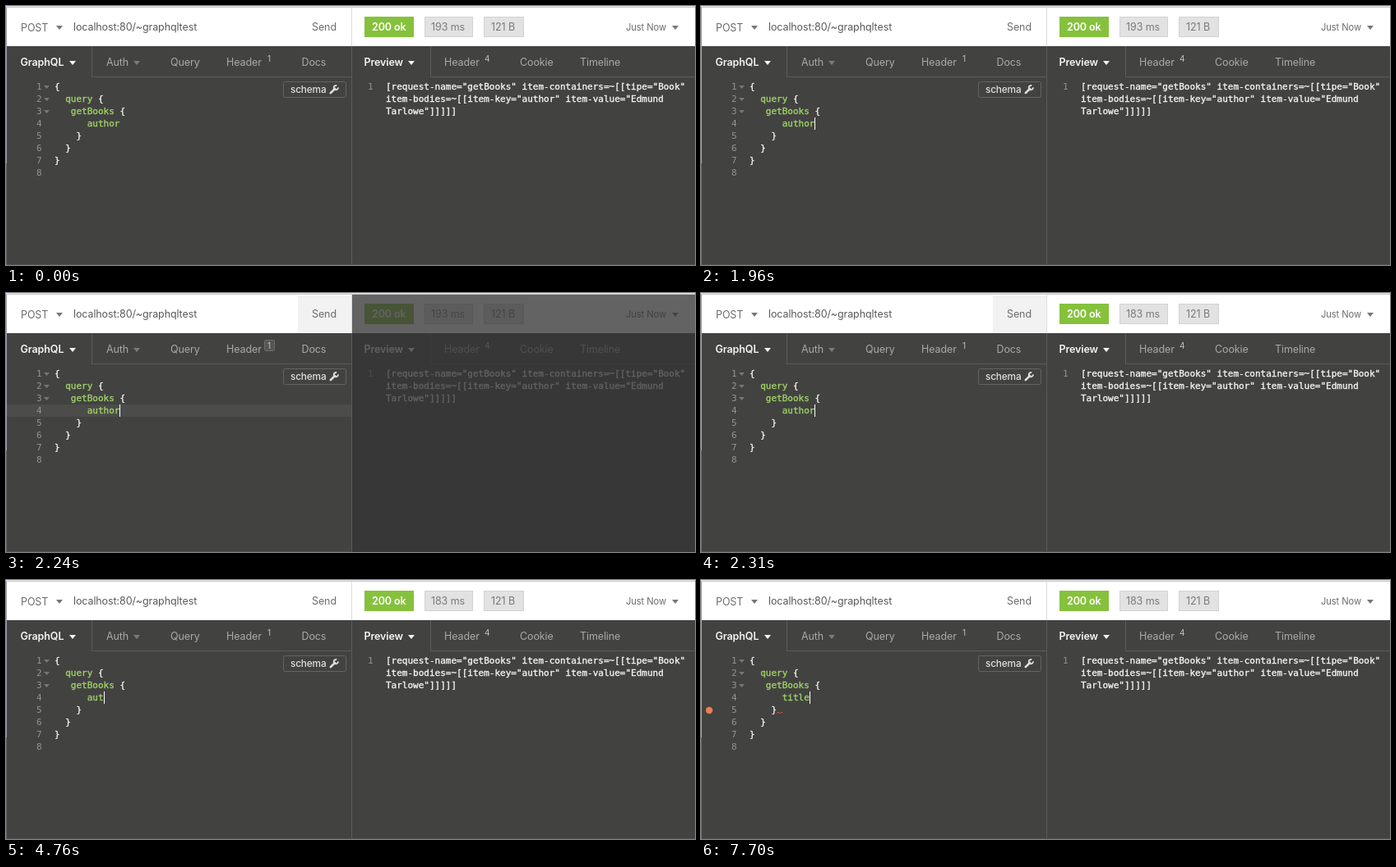
Recreate the animation shown at these times as an HTML page. Size 838x316 px, loop 8000 ms.

```html
<!DOCTYPE html>
<html lang="en">
<head>
<meta charset="utf-8">
<title>GraphQL request</title>
<style>
  html, body { margin: 0; width: 100%; height: 100%; overflow: hidden; background: #424241; }
  svg { display: block; }
  text { font: 12.5px Inter, sans-serif; letter-spacing: -0.1px; white-space: pre; }
  .strong { font-weight: 600; }
  .small { font-size: 11.2px; }
  .tiny { font-size: 10px; }
  .button { font-size: 11.8px; font-weight: 500; letter-spacing: -0.15px; }
  .code, .num { font: 11px "DejaVu Sans Mono", monospace; letter-spacing: 0; }
  .code { stroke: currentColor; stroke-width: 0.35px; }
</style>
</head>
<body>
<svg id="stage" width="838" height="316" viewBox="0 0 838 316"></svg>
<script>
const LOOP = 8000;
const COL = 6.622, CODE_X = 59, LINE = 15, BASE = 102;
const DARK = '#424241', RULE = '#5b5b5a', MUTED = '#a9a9a8', WHITE = '#f4f4f4',
      GREEN = '#a0d267', GREY = '#6c6c6c';
const stage = document.getElementById('stage');

function add(tag, attrs, parent = stage) {
  const el = document.createElementNS('http://www.w3.org/2000/svg', tag);
  for (const key in attrs) el.setAttribute(key, attrs[key]);
  return parent.appendChild(el);
}
const box = (x, y, width, height, fill, more) =>
  add('rect', { x, y, width, height, fill, ...more });
function label(x, y, str, fill, cls = '') {
  const el = add('text', { x, y, fill, class: cls, style: `color:${fill}` });
  el.textContent = str;
  return el;
}
const caret = (x, y, fill, w = 8, h = 5) =>
  add('path', { d: `M${x} ${y}h${w}l${-w / 2} ${h}z`, fill });
const code = (line, col, str, fill) =>
  label(CODE_X + col * COL, BASE + (line - 1) * LINE, str, fill, 'code');
const show = (el, on) => el.setAttribute('visibility', on ? 'visible' : 'hidden');

// Window and address bar
box(0, 0, 838, 316, DARK);
box(0, 0, 838, 49, '#ffffff');
box(0, 0, 838, 1, '#e6e5e8');
box(0, 1, 838, 1, '#c6c4ca');
const hover = box(355, 3, 65, 46, '#f2f2f2');
label(18, 30.5, 'POST', GREY);
caret(61, 24, '#777777');
label(82, 30, 'localhost:80/~graphqltest', '#5a5a5a');
label(372, 30, 'Send', GREY);

// Response summary
box(436, 13, 60, 25, '#86c13d');
label(445, 30, '200 ok', '#ffffff', 'strong');
for (const [x, w] of [[509, 59], [581, 49]])
  box(x + 0.5, 13.5, w - 1, 24, '#e2e2e2', { stroke: '#d2d2d2' });
const elapsed = label(517, 30, '', '#7a7a7a');
label(590, 30, '121 B', '#7a7a7a');
label(754, 30, 'Just Now', GREY, 'small');
caret(810, 24, '#777777');

// Tabs
box(104, 86, 316, 1, RULE);
box(516, 86, 322, 1, RULE);
box(104, 49, 1, 38, RULE);
box(516, 49, 1, 38, RULE);
label(17.5, 73, 'GraphQL', WHITE, 'strong');
caret(77, 67, WHITE);
label(435.5, 73, 'Preview', WHITE, 'strong');
caret(489, 67, WHITE);
caret(155, 67, '#7b7b7a');
for (const [x, name] of [[122, 'Auth'], [200, 'Query'], [268, 'Header'], [359.5, 'Docs'],
                         [533, 'Header'], [625, 'Cookie'], [698, 'Timeline']])
  label(x, 73, name, MUTED);
const badge = box(314.5, 57.5, 12, 13, '#555554', { stroke: '#6c6c6b', rx: 1 });
label(318, 68, '1', '#c4c4c3', 'tiny');
label(582, 68, '4', '#c4c4c3', 'tiny');

// Query editor
const activeLine = box(1, 136, 419, 15, '#4c4c4b');
for (let n = 1; n <= 8; n++) {
  label(37, BASE + (n - 1) * LINE, n, '#949493', 'num');
  if (n <= 3) caret(46, 97 + (n - 1) * LINE, '#777776', 7, 4);
}
code(1, 0, '{', WHITE);
code(2, 2, 'query', GREEN);
code(2, 8, '{', WHITE);
code(3, 3, 'getBooks', GREEN);
code(3, 12, '{', WHITE);
const field = code(4, 6, '', GREEN);
code(5, 4, '}', WHITE);
code(6, 2, '}', WHITE);
code(7, 0, '}', WHITE);
const cursor = box(138, 136, 1, 15, '#ffffff');

const error = add('g', {});
add('circle', { cx: 10, cy: 159, r: 4.2, fill: '#ee7d50' }, error);
add('path', { d: 'M92 163l2-2l2 2l2-2l1.5 1.5', fill: 'none', stroke: '#d8483c' }, error);

// Schema button with its wrench
box(337.5, 92.5, 76, 19, 'none', { stroke: '#646463', rx: 2 });
label(346, 106, 'schema', '#e0e0df', 'button');
add('path', { d: 'M394.8 106.2L400 101', stroke: '#dededd', 'stroke-width': 2.6,
  'stroke-linecap': 'round' });
add('path', { d: 'M402.2 97.2A2.6 2.6 0 1 0 403.9 99.4', fill: 'none', stroke: '#dededd',
  'stroke-width': 1.9 });

// Response body
label(440, BASE, '1', '#949493', 'num');
['[request-name="getBooks" item-containers=~[[tipe="Book"',
 'item-bodies=~[[item-key="author" item-value="Edmund',
 'Tarlowe"]]]]]'].forEach((row, i) => label(462, BASE + i * LINE, row, WHITE, 'code'));

box(0, 2, 1, 190, '#a19eb0');
box(0, 192, 1, 124, '#6a696e');
box(420, 2, 1, 47, '#dcdcdc');
box(420, 49, 1, 267, RULE);
box(1, 315, 837, 1, '#4f4f4e');
const veil = box(421, 2, 417, 314, '#353535');

// Time, field text, cursor visible
const EDITS = [
  [0, 'author', 0], [1890, 'author', 1], [2450, 'author', 0], [3010, 'author', 1],
  [3570, 'autho', 1], [4200, 'autho', 0], [4340, 'auth', 1], [4760, 'aut', 1],
  [5110, 'au', 1], [5390, 'a', 1], [5810, '', 1], [6370, '', 0],
  [6510, 't', 1], [6650, 'ti', 1], [7000, 'tit', 1], [7210, 'titl', 1], [7490, 'title', 1]
];
const VEIL = [[0, 0], [2170, 0.45], [2240, 0.77], [2310, 0]];
const at = (steps, t) => steps.findLast(step => step[0] <= t);
const within = (t, from, to) => t >= from && t < to;

function draw(t) {
  const [, text, blink] = at(EDITS, t);
  field.textContent = text;
  cursor.setAttribute('x', Math.round(CODE_X + (6 + text.length) * COL));
  show(cursor, blink);
  show(hover, within(t, 2030, 3010));
  const loading = within(t, 2170, 2310);
  show(activeLine, loading);
  show(badge, loading);
  veil.setAttribute('opacity', at(VEIL, t)[1]);
  elapsed.textContent = t < 2310 ? '193 ms' : '183 ms';
  show(error, t >= 6370);
}

const start = performance.now();
function tick() {
  draw((performance.now() - start) % LOOP);
  requestAnimationFrame(tick);
}
draw(0);
requestAnimationFrame(tick);
</script>
</body>
</html>
```
